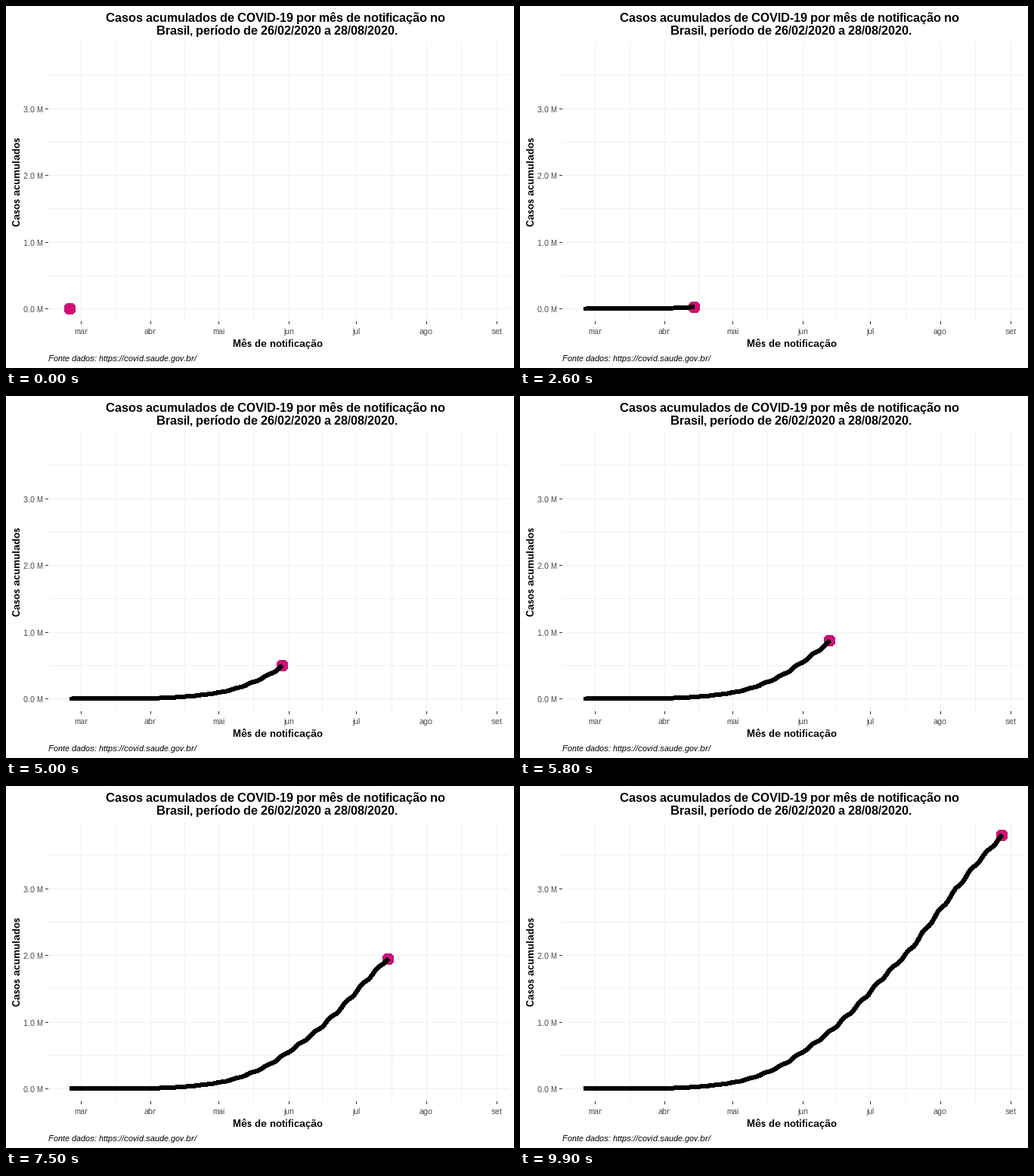
A matplotlib script for the animation above (10 s loop, 672 by 480 pixels).

```python
import math

import numpy as np
import matplotlib.pyplot as plt
from matplotlib.animation import FuncAnimation
from matplotlib.patches import Circle

W, H, DPI = 672, 480, 96
FRAMES, INTERVAL = 100, 100
LAST_DAY = 185                      # 25 Feb .. 28 Aug 2020
TOTAL = 3804.8                      # final count, in thousands
LEFT, RIGHT, TOP, BOTTOM = 56, 665, 48, 418
PX = 72 / DPI                       # one pixel in points
GRID, TICK, TICK_TEXT = "#f0f0f0", "#333333", "#4d4d4d"
MONTHS = {"mar": 5, "abr": 36, "mai": 66, "jun": 97,
          "jul": 127, "ago": 158, "set": 189}

# Whole-pixel glyph advances keep the small type crisp
plt.rcParams.update({"font.family": "Liberation Sans",
                     "text.hinting": "native",
                     "text.hinting_factor": 1})


def x_at(day):
    return 84.1 + 2.989 * day


def y_at(thousands):
    return 401.5 - 0.08843 * thousands


def mid_pixel(v):
    return math.floor(v) + 0.5


def cumulative():
    """Sum a smooth daily rate with a weekly rhythm (slow Sundays and Mondays)."""
    days = np.arange(LAST_DAY + 1)
    knots = [0, 28, 43, 64, 85, 92, 106, 113, 127, 141, 148, 169, 177, 185]
    rates = [0, 0.2, 1.4, 4.8, 16, 22, 26, 31, 38, 33, 46, 43.5, 37.5, 37]
    weekly = 1 + 0.42 * np.cos(2 * np.pi * (days - 2) / 7)
    cases = np.cumsum(np.interp(days, knots, rates) * weekly)
    return cases * TOTAL / cases[-1]


fig = plt.figure(figsize=(W / DPI, H / DPI), dpi=DPI, facecolor="white")
ax = fig.add_axes([0, 0, 1, 1])
ax.set(xlim=(0, W), ylim=(H, 0))
ax.axis("off")


def rule(xs, ys, color, z=1):
    ax.plot(xs, ys, color=color, lw=PX, solid_capstyle="butt",
            snap=False, zorder=z)


def label(x, y, text, size, **kw):
    ax.text(x, y, text, fontsize=size * PX, va="baseline", **kw)


def v_grid(day):
    x = mid_pixel(x_at(day))
    rule([x, x], [TOP, BOTTOM], GRID)
    return x


def h_grid(thousands):
    y = mid_pixel(y_at(thousands))
    rule([LEFT, RIGHT], [y, y], GRID)
    return y


starts = list(MONTHS.values())
for a, b in zip(starts, starts[1:]):
    v_grid((a + b) / 2)
for half in range(4):
    h_grid(500 + 1000 * half)

for name, day in MONTHS.items():
    x = v_grid(day)
    rule([x, x], [BOTTOM, BOTTOM + 4], TICK, 2)
    label(x - 0.5, 435, name, 11, ha="center", color=TICK_TEXT)
for million in range(4):
    y = h_grid(1000 * million)
    rule([LEFT - 4, LEFT], [y, y], TICK, 2)
    label(49, y + 4.5, f"{million}.0 M", 11, ha="right", color=TICK_TEXT)

label(132, 21, "Casos acumulados de COVID-19 por mês de notificação no",
      16, weight="bold")
label(199, 38, "Brasil, período de 26/02/2020 a 28/08/2020.",
      16, weight="bold")
label(359.5, 452, "Mês de notificação", 13.33, weight="bold", ha="center")
label(19, 232.5, "Casos acumulados", 13, weight="bold", ha="center",
      rotation=90, rotation_mode="anchor")
label(56, 471, "Fonte dados: https://covid.saude.gov.br/", 11, style="italic")

xs = x_at(np.arange(LAST_DAY + 1))
ys = y_at(cumulative())

dot = ax.add_patch(Circle((0, 0), 7.5, fc="#cd1076", ec="none",
                          antialiased=False, snap=False, zorder=3))
curve, = ax.plot([], [], color="black", lw=5 * PX, antialiased=False,
                 snap=False, solid_capstyle="butt", solid_joinstyle="round",
                 zorder=4)


def update(frame):
    # The reveal moves in whole days, rounded up
    day = -(-frame * LAST_DAY // (FRAMES - 1))
    dot.center = mid_pixel(xs[day]), mid_pixel(ys[day])
    shown = slice(0, day + 1 if day else 0)
    curve.set_data(xs[shown], ys[shown])
    return dot, curve


anim = FuncAnimation(fig, update, frames=FRAMES, interval=INTERVAL,
                     repeat=True, repeat_delay=0)
plt.show()
```
